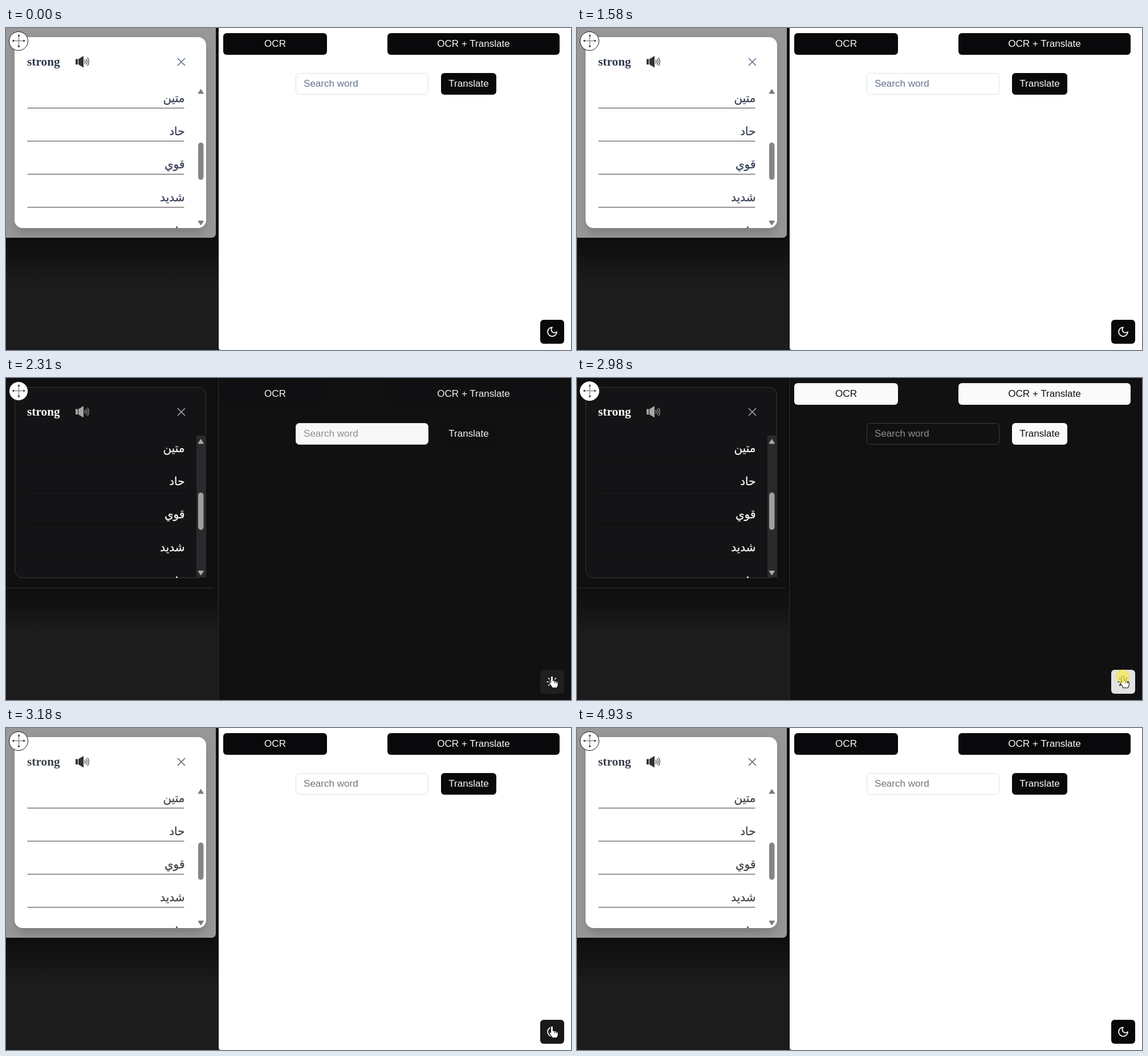
Write an HTML page that moves like this. It is 991 px wide and 565 px high and loops after 5.11 s.

```html
<!DOCTYPE html>
<html lang="en">
<head>
<meta charset="utf-8">
<title>Dictionary popup</title>
<style>
html, body { margin: 0; width: 100%; height: 100%; overflow: hidden; background: #fff; }
svg { display: block; width: 991px; height: 565px; }
#stage {
  --page: #fff; --panel: #989898; --card: #fff; --cardLine: #fff; --shade: .2;
  --title: #2f3a4e; --word: #3a4358; --rule: #3c3c3c; --close: #64748b; --hint: #64748b;
  --speaker: #333; --track: none; --thumb: #858585; --arrow: #7c7c7c; --edge: #0e0e0e;
}
#stage.late { --title: #3a3f48; --word: #45454b; --close: #666; --hint: #757575; }
#stage.dark {
  --page: #111; --panel: #101011; --card: #141416; --cardLine: #37373a; --shade: 0;
  --title: #fff; --word: #f4f4f5; --rule: #0c0c0c; --close: #a0a0a6; --hint: #8f8f93;
  --speaker: #a6a6a6; --track: #2a2a2d; --thumb: #9f9f9f; --arrow: #a8a8a8; --edge: #303030;
}
text { font: 17.07px "Liberation Sans", Arial, sans-serif; }
.mid { text-anchor: middle; }
.btn { fill: var(--btn); }
.label { fill: var(--label); }
#title { font: bold 21.33px "Liberation Serif", "Times New Roman", serif; fill: var(--title); }
.word { font: 20px "DejaVu Sans", sans-serif; direction: rtl; fill: var(--word); stroke: var(--word); stroke-width: .35; }
.icon { fill: none; stroke: var(--label); stroke-width: 2; stroke-linecap: round; stroke-linejoin: round; }
#sun, .dark #moon { display: none; }
.dark #sun { display: inline; }
.pointer { fill: #fff; stroke: #111; stroke-width: 1.1; stroke-linejoin: round; }
</style>
</head>
<body>
<svg id="stage" viewBox="0 0 991 565">
  <defs>
    <linearGradient id="floor" gradientUnits="userSpaceOnUse" x1="0" y1="368" x2="0" y2="450">
      <stop offset="0" stop-color="#0e0e0e"/>
      <stop offset=".35" stop-color="#121212"/>
      <stop offset="1" stop-color="#1c1c1c"/>
    </linearGradient>
    <filter id="blur" x="-20%" y="-20%" width="140%" height="140%"><feGaussianBlur stdDeviation="9"/></filter>
    <clipPath id="panelClip"><path d="M0 0H368V361a7 7 0 0 1-7 7H0Z"/></clipPath>
  </defs>

  <rect width="991" height="565" fill="url(#floor)"/>
  <path d="M373 0H991V565H377a4 4 0 0 1-4-4Z" fill="var(--page)"/>
  <path d="M372.5 0V565M0 368.5H366" stroke="var(--edge)" fill="none"/>

  <g clip-path="url(#panelClip)">
    <rect width="368" height="368" fill="var(--panel)"/>
    <rect x="18" y="24" width="331" height="335" rx="14" style="opacity: var(--shade)" filter="url(#blur)"/>
  </g>
  <rect x="15.5" y="16.5" width="335" height="334" rx="13" fill="var(--card)" stroke="var(--cardLine)"/>

  <text id="title" x="37" y="66">strong</text>
  <g fill="var(--speaker)">
    <path d="M122 54.5h4v9.5h-4zM127 54.5 136 49V69.5L127 64z"/>
    <path d="M138 56q2 3.2 0 6.5M140.5 54q3.5 5.2 0 10.5M143 52q4.5 7.2 0 14.5" fill="none" stroke="var(--speaker)" stroke-width="1.2"/>
  </g>
  <path d="M301.5 53.5 313.5 65.5M313.5 53.5 301.5 65.5" stroke="var(--close)" stroke-width="1.7" stroke-linecap="round"/>
  <g id="words"></g>
  <circle cx="299.5" cy="349.5" r="1.5" fill="var(--word)"/>

  <rect x="334" y="101" width="17" height="249" fill="var(--track)"/>
  <rect x="337" y="201" width="9.5" height="65.5" rx="4.7" fill="var(--thumb)"/>
  <path d="M341.7 107.5 346.5 115H337zM341.7 346 346.5 338.5H337z" fill="var(--arrow)" stroke="var(--arrow)" stroke-linejoin="round"/>

  <circle cx="22" cy="23" r="16.5" fill="#fff" stroke="var(--ring)"/>
  <path d="M11 22.5H33M22.5 12V34" stroke="#6a6a6a"/>
  <path d="M10.5 22.5l3.5-2v4zM34 22.5l-3.5-2v4zM22.5 11l-2 3.5h4zM22.5 34.5l-2-3.5h4z" fill="#222"/>

  <g id="buttons"></g>
  <rect x="508.5" y="79.5" width="232" height="37" rx="5.9" fill="var(--field)" stroke="var(--fieldLine)"/>
  <text x="522" y="103" fill="var(--hint)">Search word</text>

  <rect x="937" y="512" width="42" height="42" rx="6" fill="var(--toggle)"/>
  <g class="icon" transform="translate(947.4 522.4) scale(.889)">
    <path id="moon" d="M12 3a6 6 0 0 0 9 9 9 9 0 1 1-9-9Z"/>
    <g id="sun"><circle cx="12" cy="12" r="4"/><path id="rays"/></g>
  </g>

  <g id="cursor">
    <path id="hand" class="pointer" d="M-2 1.500a2 2 0 0 1 4 0V8c1-1 3-.6 3.200.6 1-.6 2.700-.2 3 .9 1.200-.4 2.600.3 2.600 1.800v4c0 2-1.600 3-2 5H.8c-.6-2.400-4-5.200-5.300-8-.8-1.800 1.200-2.800 2.500-1.300z M5.200 8.600v3.400M8.200 9.500v3"/>
    <path id="pointer" class="pointer" d="M0 0v15l3.500-3.300 2.400 5.400 2.400-1-2.400-5.300h4.800z"/>
    <circle id="press" r="12" fill="#f7ea3c" opacity=".65"/>
  </g>
</svg>
<script>
const LOOP = 5110;
const $ = id => document.getElementById(id);
const stage = $('stage');

$('words').innerHTML = ['متين', 'حاد', 'قوي', 'شديد'].map((word, i) => {
  const y = 140.5 + Math.round(i * 57.9);
  return `<path d="M37.5 ${y}H312.5" stroke="var(--rule)"/><text class="word" x="313.5" y="${y - 10.5}">${word}</text>`;
}).join('');

$('buttons').innerHTML = [
  ['OCR', 381, 9, 182], ['OCR + Translate', 669, 9, 302], ['Translate', 763, 79, 97]
].map(([label, x, y, w]) =>
  `<rect class="btn" x="${x}" y="${y}" width="${w}" height="38" rx="6"/>
   <text class="label mid" x="${x + w / 2}" y="${y + 24}">${label}</text>`).join('');

$('rays').setAttribute('d', Array.from({ length: 8 }, (_, i) => {
  const c = Math.cos(i * Math.PI / 4), s = Math.sin(i * Math.PI / 4);
  return `M${12 + 8 * c} ${12 + 8 * s}L${12 + 10 * c} ${12 + 10 * s}`;
}).join(''));

// Colours that fade with the theme: [light, dark]
const FADES = {
  btn: [[9, 9, 11], [250, 250, 250]],
  label: [[250, 250, 250], [16, 16, 18]],
  field: [[255, 255, 255], [17, 17, 18]],
  fieldLine: [[221, 226, 232], [62, 62, 66]],
  ring: [[20, 20, 20], [255, 255, 255]]
};
const HOVER = [[25, 25, 28], [226, 226, 228]];

// time, dark, fade to dark, hover, pressed, cursor offset from its resting place (null = away)
const STEPS = [
  [0, 0, 0, 0, 0, null],
  [1660, 0, 0, 0, 0, [-14, 36]],
  [1720, 0, 0, .3, 0, [-7, 20]],
  [1790, 0, 0, .8, 0, [-2, 7]],
  [1850, 0, 0, 1, 0, [0, 0]],
  [2120, 0, 0, 1, 1, [0, 0]],
  [2310, 1, .03, 1, 0, [0, 0]],
  [2380, 1, .62, 1, 0, [0, 0]],
  [2450, 1, 1, 1, 0, [0, 0]],
  [2780, 1, 1, 1, 1, [0, 0]],
  [3060, 0, .95, 1, 0, [0, 0]],
  [3120, 0, .38, 1, 0, [0, 0]],
  [3180, 0, 0, 1, 0, [0, 0]],
  [4120, 0, 0, 1, 0, [-2, 6]],
  [4190, 0, 0, 1, 0, [-6, 17]],
  [4250, 0, 0, .6, 0, [-12, 32]],
  [4320, 0, 0, .2, 0, [-15, 40]],
  [4380, 0, 0, 0, 0, null]
];

const mix = (a, b, p) => a.map((v, i) => v + (b[i] - v) * p);
const paint = (name, c) => stage.style.setProperty('--' + name, `rgb(${c.map(Math.round)})`);
const show = (id, on) => { $(id).style.display = on ? '' : 'none'; };

function draw([time, dark, fade, hover, pressed, at]) {
  stage.classList.toggle('dark', !!dark);
  stage.classList.toggle('late', time >= 2310);
  for (const name in FADES) paint(name, mix(...FADES[name], fade));
  paint('toggle', mix(mix(...FADES.btn, fade), mix(...HOVER, fade), hover));
  show('cursor', at);
  if (!at) return;
  const inside = at[1] < 30;
  show('press', pressed);
  show('hand', inside);
  show('pointer', !inside);
  $('cursor').setAttribute('transform', `translate(${957.5 + at[0]} ${523.5 + at[1]})`);
}

const start = performance.now();
let shown;
function tick() {
  const t = Math.max(0, performance.now() - start) % LOOP;
  const step = STEPS.filter(s => s[0] <= t).pop();
  if (step !== shown) draw(shown = step);
  requestAnimationFrame(tick);
}
tick();
</script>
</body>
</html>
```
